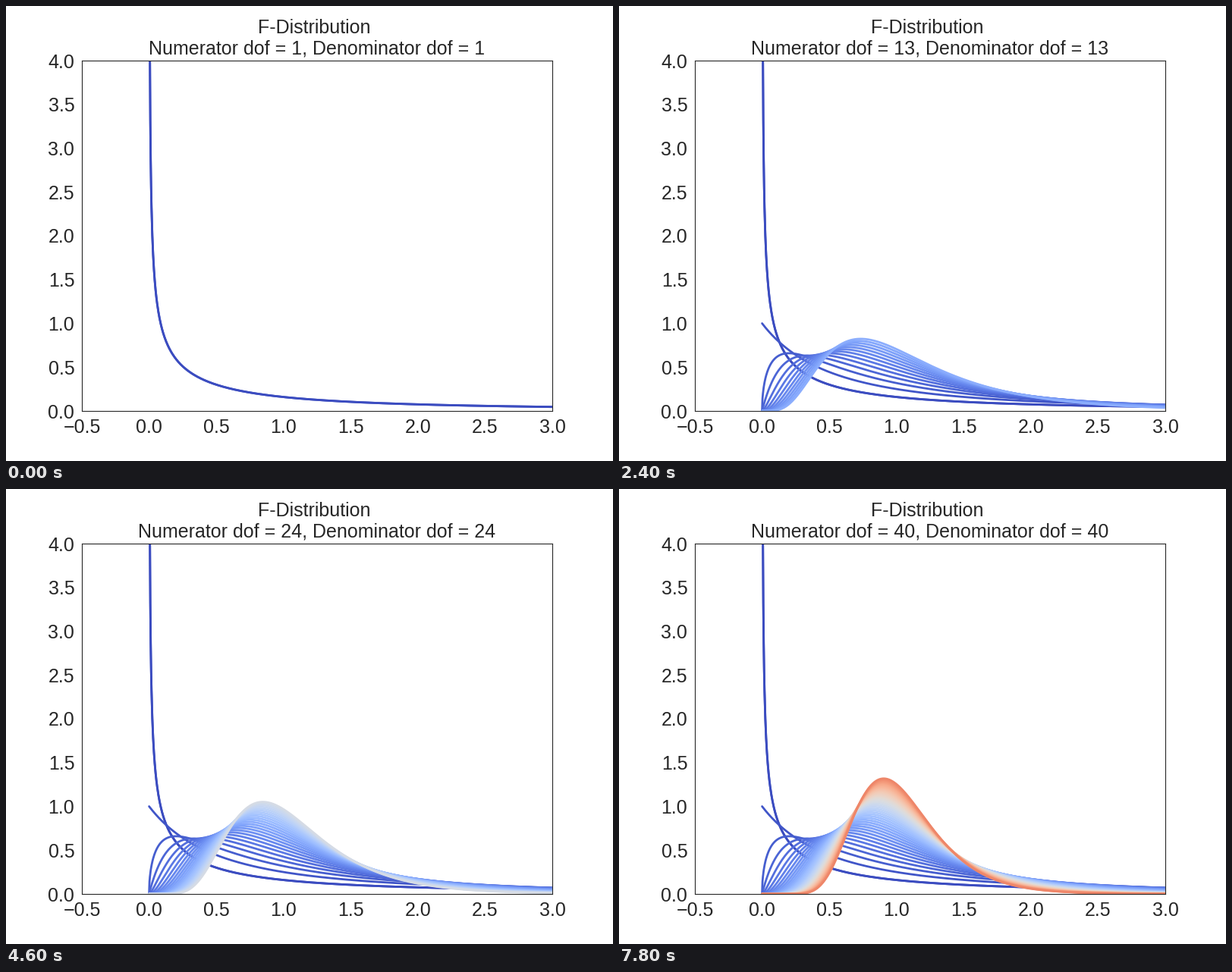
A matplotlib script for the animation above (8000 ms loop, 800 px wide and 600 px high).

```python
import math

import matplotlib.pyplot as plt
import numpy as np
from matplotlib.animation import FuncAnimation

FRAMES = 40
STEP_MS = 200
COLOR_STEPS = 50
INK = "0.15"

plt.rcParams.update({
    "font.family": "Liberation Sans",
    "font.size": 18,
    "text.color": INK,
    "axes.edgecolor": INK,
    "axes.linewidth": 0.8,
    "axes.titlesize": 18,
    "axes.titlepad": 6,
    "xtick.color": INK,
    "ytick.color": INK,
    "xtick.major.size": 0,
    "ytick.major.size": 0,
    "xtick.major.pad": 7,
    "ytick.major.pad": 7,
    "lines.solid_capstyle": "round",
})


def f_pdf(x, dof):
    """F density with equal numerator and denominator dof."""
    scale = math.exp(math.lgamma(dof) - 2 * math.lgamma(dof / 2))
    return scale * x ** (dof / 2 - 1) / (1 + x) ** dof


fig, ax = plt.subplots(figsize=(8, 6), dpi=100)
fig.subplots_adjust(left=0.125, right=0.9, bottom=0.11, top=0.88)
ax.set_xlim(-0.5, 3)
ax.set_ylim(0, 4)
ax.set_xticks(np.arange(-0.5, 3.1, 0.5))
ax.set_yticks(np.arange(0, 4.1, 0.5))
ax.xaxis.set_major_formatter("{x:.1f}")
ax.yaxis.set_major_formatter("{x:.1f}")
title = ax.set_title("")

colors = plt.cm.coolwarm(np.linspace(0, 1, COLOR_STEPS))
x = np.linspace(0, 3, 1000)


def add_curve(dof):
    start = 1 if dof == 1 else 0  # the density is infinite at zero for dof 1
    xs = x[start:]
    return ax.plot(xs, f_pdf(xs, dof), color=colors[dof - 1], lw=2)[0]


add_curve(1)  # the first curve is laid down twice, giving it firmer edges
curves = [add_curve(dof) for dof in range(1, FRAMES + 1)]


def update(frame):
    dof = frame + 1
    for i, curve in enumerate(curves):
        curve.set_visible(i <= frame)
    title.set_text(f"F-Distribution \nNumerator dof = {dof}, Denominator dof = {dof}")
    return [*curves, title]


anim = FuncAnimation(fig, update, frames=FRAMES, interval=STEP_MS,
                     init_func=lambda: update(0), repeat=True, repeat_delay=0)
plt.show()
```
